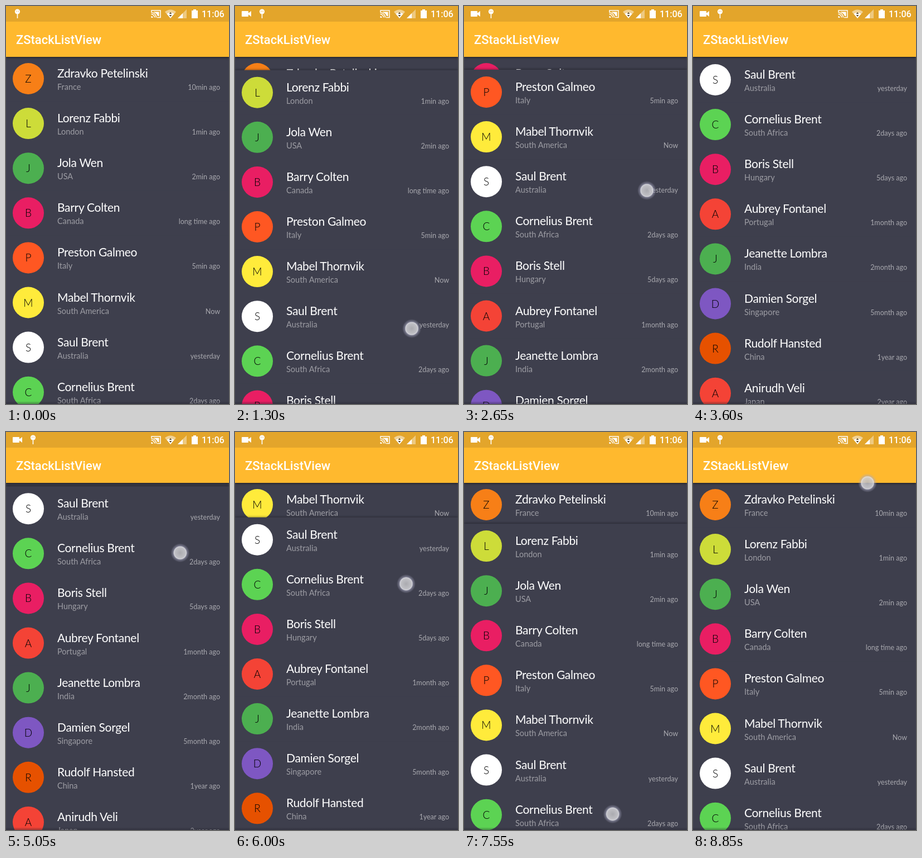
Animation, 400 px wide and 712 px high, one loop 8900 ms. Source, as an HTML page:

```html
<!DOCTYPE html>
<html lang="en">
<head>
<meta charset="utf-8">
<title>ZStackListView</title>
<style>
  html, body { margin: 0; width: 100%; height: 100%; overflow: hidden; background: #3e3f4d; }
  #stage { position: relative; width: 400px; height: 712px; overflow: hidden; background: #3e3f4d; }
  .row { position: absolute; left: 0; top: 0; width: 400px; height: 81px; background: #3e3f4d; font-family: Lato, sans-serif; }
  .row.over { box-shadow: 0 -1px 4px rgba(0, 0, 0, .38); }
  .row > * { position: absolute; white-space: nowrap; }
  .dot { left: 12px; top: 12px; width: 56px; height: 56px; border-radius: 50%; font-size: 19px; font-weight: 300; line-height: 56px; text-align: center; color: #000; }
  .name { left: 92px; top: 17px; font-size: 21px; line-height: 26px; letter-spacing: -.3px; color: #fff; }
  .place { left: 92px; top: 45px; font-size: 14.5px; line-height: 20px; color: #9d9da4; }
  .ago { right: 16px; top: 46px; font-size: 12.5px; line-height: 20px; color: #a9a9af; }
  #bar { position: absolute; left: 0; top: 0; width: 400px; height: 91px; background: #ffb92e; box-shadow: 0 1px 4px rgba(0, 0, 0, .6); }
  #status { position: absolute; left: 0; top: 0; }
  #title { position: absolute; left: 18px; top: 47px; font: 500 22px/28px Roboto, sans-serif; color: #fff; }
  #foot { position: absolute; left: 0; bottom: 0; width: 400px; height: 5px; background: linear-gradient(rgba(30, 30, 40, 0), rgba(30, 30, 40, .4)); }
  #touch { position: absolute; left: -17px; top: -17px; width: 34px; height: 34px; border-radius: 50%;
    background: radial-gradient(circle, rgba(185, 185, 189, .88) 0, rgba(204, 204, 208, .9) 9px, rgba(224, 224, 230, .9) 11px,
      rgba(170, 170, 195, .5) 12.5px, rgba(140, 140, 175, 0) 17px); }
</style>
</head>
<body>
<div id="stage">
  <div id="list"></div>
  <div id="foot"></div>
  <div id="bar">
    <svg id="status" width="400" height="28" fill="#fff">
      <rect width="400" height="28" fill="#e3a52b"/>
      <path id="cam" d="M13 9h10q1 0 1 1v2.800l5-3.800v10l-5-3.800v2.800q0 1-1 1h-10q-1 0-1-1v-8q0-1 1-1z"/>
      <g id="pin">
        <circle cy="10" r="4.600"/>
        <path d="M-.8 14h1.600v8h-1.600z"/>
        <circle cx="-1.600" cy="9.300" r=".7" fill="#e3a52b"/>
        <circle cx="1.600" cy="9.300" r=".7" fill="#e3a52b"/>
      </g>
      <g fill="none" stroke="#fff" stroke-width="1.500">
        <path d="M261 11V8h16v12.500h-6"/>
        <path d="M260.500 14.500a6 6 0 0 1 6 6M260.500 11.700a9 9 0 0 1 9 9"/>
      </g>
      <path d="M260.500 18a3 3 0 0 1 3 3h-3zM265 10.500h9.500v7.500h-2.500q-1.500-5.500-7-6.500z"/>
      <path d="M285 10.500q10-8 20 0L295 22z" opacity=".5"/>
      <path d="M288.500 14q6.500-4.500 13 0L295 22z"/>
      <path d="M295 11l2.500 3h-5zM295 19l2.500-3h-5z" fill="#5b4a2a"/>
      <path d="M324 6v16h-16z" opacity=".4"/>
      <path d="M317 13v9h-9z"/>
      <path d="M336 6h5v2h3v14h-11V8h3z"/>
      <text x="351" y="20" font-family="Roboto, sans-serif" font-size="16" font-weight="500">11:06</text>
    </svg>
    <div id="title">ZStackListView</div>
  </div>
  <div id="touch"></div>
</div>
<script>
const LOOP = 8900, STEP = 50, TOP = 90, ROW = 80.1;

const people = [
  ['Zdravko Petelinski', 'France', '10min ago', '#f77f17'],
  ['Lorenz Fabbi', 'London', '1min ago', '#cddc39'],
  ['Jola Wen', 'USA', '2min ago', '#4caf50'],
  ['Barry Colten', 'Canada', 'long time ago', '#e91e63'],
  ['Preston Galmeo', 'Italy', '5min ago', '#ff5722'],
  ['Mabel Thornvik', 'South America', 'Now', '#ffeb3b'],
  ['Saul Brent', 'Australia', 'yesterday', '#ffffff'],
  ['Cornelius Brent', 'South Africa', '2days ago', '#5cd353'],
  ['Boris Stell', 'Hungary', '5days ago', '#e91e63'],
  ['Aubrey Fontanel', 'Portugal', '1month ago', '#f44336'],
  ['Jeanette Lombra', 'India', '2month ago', '#4caf50'],
  ['Damien Sorgel', 'Singapore', '5month ago', '#7e57c2'],
  ['Rudolf Hansted', 'China', '1year ago', '#e65100'],
  ['Anirudh Veli', 'Japan', '2year ago', '#f44336']
];

// [time, offset]: a slow drag up, a rest, a drag back down
const drag = [
  [700, 0], [1300, 55.4], [2650, 296.4], [3600, 478.6],
  [4500, 478.6], [6000, 417.9], [6950, 164.1], [7650, 0]
];

const $ = id => document.getElementById(id);
const clamp = u => Math.min(1, Math.max(0, u));

const slopes = drag.slice(1).map(([t, v], i) => (v - drag[i][1]) / (t - drag[i][0]));

// speed at a key: geometric mean of both sides, still at the ends
function speed(i) {
  const a = slopes[i - 1] || 0, b = slopes[i] || 0;
  return Math.sign(a) * Math.sqrt(Math.max(0, a * b));
}

function scrollAt(t) {
  const i = drag.findIndex(key => t < key[0]);
  if (i < 1) return 0;
  const [t0, v0] = drag[i - 1], [t1, v1] = drag[i];
  const d = t1 - t0, u = (t - t0) / d, w = 1 - u;
  return w * w * ((1 + 2 * u) * v0 + u * d * speed(i - 1))
    + u * u * ((3 - 2 * u) * v1 - w * d * speed(i));
}

// the finger moves along a line with the list, then pulls down from the top
function fingerAt(t, offset) {
  if (t >= 700 && t <= 3350) return [314.500 + .0455 * offset, 633.800 - 1.025 * offset];
  if (t >= 4500 && t <= 7750) return [266 + .098 * offset, 689.500 - offset];
  if (t >= 8750) return [341 - .28 * (t - 8750), 23 + .68 * (t - 8750)];
  return null;
}

function add(parent, cls, text = '') {
  const el = document.createElement('div');
  el.className = cls;
  el.textContent = text;
  return parent.appendChild(el);
}

const rows = people.map(([name, place, ago, color]) => {
  const row = add($('list'), 'row');
  add(row, 'dot', name[0]).style.background = color;
  add(row, 'name', name);
  add(row, 'place', place);
  add(row, 'ago', ago);
  return row;
});

function draw(t) {
  const offset = scrollAt(t);
  rows.forEach((row, i) => {
    // rows pin under the bar while the next one slides over them
    const y = Math.max(0, i * ROW - offset);
    row.style.transform = `translateY(${TOP + y}px)`;
    row.classList.toggle('over', y > 0 && y < ROW - .5);
  });

  const shown = clamp(t / 150);
  $('cam').setAttribute('opacity', shown);
  $('pin').setAttribute('transform', `translate(${20.5 + 28 * shown} 0)`);

  const finger = fingerAt(t, offset);
  $('touch').style.visibility = finger ? 'visible' : 'hidden';
  if (finger) $('touch').style.transform = `translate(${finger[0]}px, ${finger[1]}px)`;
}

const start = performance.now();
function tick() {
  const t = (performance.now() - start) % LOOP;
  draw(Math.floor(t / STEP) * STEP);
  requestAnimationFrame(tick);
}
tick();
</script>
</body>
</html>
```
